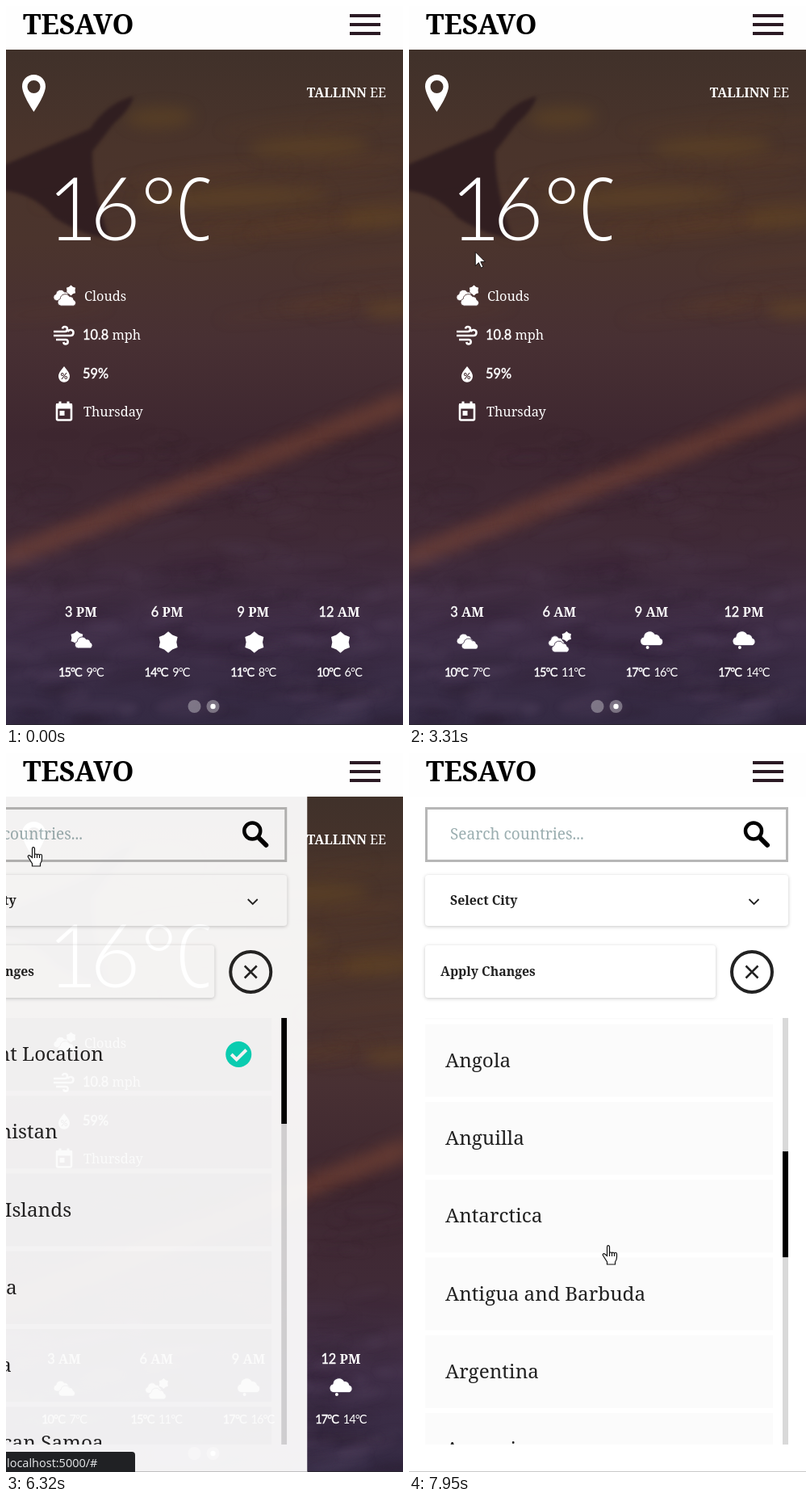
These frames come from a looping animation (492 by 890 pixels, 8 s). An HTML page with a canvas:

```html
<!DOCTYPE html>
<html lang="en">
<head>
<meta charset="utf-8">
<title>Weather</title>
<style>
html, body { margin: 0; width: 100%; height: 100%; overflow: hidden; background: #fff; }
#stage { position: relative; width: 492px; height: 890px; overflow: hidden; }
canvas, svg { position: absolute; left: 0; top: 0; }
text { font-family: "Noto Serif", serif; fill: #fff; white-space: pre; }
.num { font-family: Lato, "Open Sans", sans-serif; font-weight: 400; }
.firm { stroke: #fff; stroke-width: .4; }
.big { font-size: 108px; font-weight: 300; }
.slim { font-family: "Open Sans", "Noto Sans", sans-serif; font-stretch: 75%; }
.b { font-weight: 700; }
.mid { text-anchor: middle; }
.info { font-size: 16.3px; font-weight: 500; }
.hour { font-size: 16.3px; font-weight: 700; }
.temp { font-size: 14.5px; letter-spacing: -.9px; }
.white { fill: #fff; }
.line { fill: none; stroke: #fff; stroke-width: 2.6; }
.ink { fill: none; stroke: #222; }
.card { fill: #fff; filter: drop-shadow(0 1px 2px rgba(0,0,0,.22)); }
#panel text { fill: #212121; }
#panel .hint { fill: #9baeb0; }
#status {
  position: absolute; left: 0; bottom: 0; width: 120px; height: 25px;
  background: #202124; color: #e8eaed; border-radius: 0 4px 0 0;
  font: 14.5px/27px "Open Sans", "Noto Sans", sans-serif; text-indent: 1px;
  white-space: nowrap; overflow: hidden;
}
</style>
</head>
<body>
<div id="stage">
<canvas id="sky" width="492" height="890"></canvas>
<svg width="492" height="890" viewBox="0 0 492 890">
  <defs>
    <path id="cloud" d="M-9 7a5 5 0 0 1-1-9.800A7 7 0 0 1 3-6 5.500 5.500 0 0 1 9-1.500a4.500 4.500 0 0 1 0 8.500z"/>
    <clipPath id="strip"><rect x="20" y="735" width="450" height="105"/></clipPath>
    <clipPath id="window"><rect x="20" y="328" width="450" height="528"/></clipPath>
  </defs>

  <path class="white" fill-rule="evenodd" d="M34.500 85C26 85 20 91.500 20 99.500 20 110 34.500 131 34.500 131S49 110 49 99.500C49 91.500 43 85 34.500 85zm0 7a8 8 0 0 1 0 16 8 8 0 0 1 0-16z"/>
  <text x="471" y="112.500" text-anchor="end" font-size="16"><tspan font-weight="800">TALLINN</tspan> EE</text>
  <text class="num big" x="51 104 167" y="290">16°<tspan class="slim" x="210">C</tspan></text>

  <g id="now"></g>
  <text class="info" x="97" y="365">Clouds</text>
  <path class="line" d="M59 403h14a3 3 0 1 0-3-3.500M59 408h21a3.500 3.500 0 1 0-3.300-4.700M62 413h12a2.700 2.700 0 1 1-2.700 3"/>
  <text class="info" x="95" y="413"><tspan class="num firm">10.8</tspan> mph</text>
  <path class="white" d="M72 446c3 4 7 8 7 12.500a7 7.300 0 0 1-14 0c0-4.500 4-8.500 7-12.500z"/>
  <text class="num mid" x="72" y="462" font-size="11" style="fill:#432b30;font-weight:700">%</text>
  <text class="info num firm" x="95" y="461">59%</text>
  <rect class="line" x="63" y="493" width="18" height="19.500" rx="1.500"/>
  <path class="white" d="M62 492h20v6.500H62zM65.500 489.500h3v4h-3zM75.500 489.500h3v4h-3zM66.500 501h6v6h-6z"/>
  <text class="info" x="96" y="508">Thursday</text>

  <g clip-path="url(#strip)"><g id="hours"></g></g>
  <g fill="#fff" fill-opacity=".34"><circle cx="233.500" cy="867" r="8"/><circle cx="256.500" cy="867" r="8"/></g>
  <circle id="dot" class="white" cx="233.500" cy="867" r="3.200"/>
  <rect y="889" width="492" height="1" fill="#2a2530"/>

  <g id="panel">
    <rect x="-8" y="54" width="503" height="836" fill="#fff"/>
    <rect x="-8" y="889" width="503" height="1" fill="#c9c9c9"/>
    <rect x="21.500" y="68.500" width="447" height="65" fill="#fff" stroke="#b7b7b7" stroke-width="3"/>
    <text class="hint" x="51" y="107" font-size="19">Search countries...</text>
    <circle cx="427" cy="96.500" r="10" fill="none" stroke="#000" stroke-width="4.500"/>
    <path d="M435 105l9 9" stroke="#000" stroke-width="6" stroke-linecap="round"/>
    <rect class="card" x="20" y="151" width="450" height="63" rx="4"/>
    <text class="b" x="51" y="188" font-size="15.800">Select City</text>
    <path class="ink" d="M421.500 181l6 6 6-6" stroke-width="1.800"/>
    <rect class="card" x="20" y="238" width="360" height="65" rx="4"/>
    <text class="b" x="39" y="276" font-size="15.800">Apply Changes</text>
    <circle class="ink" cx="425" cy="271" r="25" stroke-width="4"/>
    <path class="ink" d="M417.500 263.500l15 15m0-15l-15 15" stroke-width="2.500"/>
    <g clip-path="url(#window)">
      <g id="list"></g>
      <rect x="463" y="328" width="7" height="528" fill="#d9d9d9"/>
      <rect id="thumb" x="463" y="328" width="7" height="131" fill="#000"/>
    </g>
  </g>

  <rect width="492" height="54" fill="#fefefe"/>
  <text x="21" y="34.500" font-size="34.300" style="fill:#000;font-weight:800">TESAVO</text>
  <path d="M426 12h38M426 23h38M426 34h38" stroke="#2b1a24" stroke-width="3.800"/>
</svg>

<div id="status">localhost:5000/#</div>

<svg width="492" height="890" viewBox="0 0 492 890">
  <g id="cursor">
    <circle id="press" r="15" fill="#a09a28"/>
    <path id="arrow" d="M0 0v17l4-4 3 6.500 2.500-1.200-3-6.300h5.500z" fill="#fff" stroke="#000" stroke-width=".8"/>
    <path id="beam" d="M-3.500-8.500h2.500l1 1 1-1h2.500M0-7.500V7.500M-3.500 8.500h2.500l1-1 1 1h2.500" fill="none" stroke="#c3c9cc"/>
    <g id="hand" fill="#fff" stroke="#111" stroke-width="1.200">
      <path d="M-1.500 1.500v11l-3-2.500c-1.500-1-3 .5-2 2l5 8v3h10v-3c1.500-2 2-4 2-6v-4c0-2-3-2-3 0 0-2-3-2.500-3-.5 0-2-3-2-3 0v-8c0-2.500-3-2.500-3 0z"/>
      <path d="M1.500 9v4M4.500 9v4M7.500 9.500V13" fill="none"/>
    </g>
  </g>
</svg>
</div>

<script>
const LOOP = 8000;
const $ = id => document.getElementById(id);

// Backdrop: dusk gradient, glowing streaks, wing and a bank of cloud
function paintSky() {
  const g = $('sky').getContext('2d');
  let seed = 7;
  const rnd = (lo, hi) => lo + (hi - lo) * (seed = seed * 16807 % 2147483647) / 2147483647;
  const blob = (x, y, rx, ry, turn, color, soft) => {
    g.filter = `blur(${soft}px)`;
    g.fillStyle = color;
    g.beginPath();
    g.ellipse(x, y, rx, ry, turn, 0, 7);
    g.fill();
  };

  const dusk = g.createLinearGradient(0, 54, 0, 890);
  ['#40312a', '#4a342b', '#4b342d', '#483033', '#3e2730', '#402a36', '#3f2e47', '#342a43']
    .forEach((c, i, all) => dusk.addColorStop(i / (all.length - 1), c));
  g.fillStyle = dusk;
  g.fillRect(0, 0, 492, 890);

  for (let i = 0; i < 24; i++)
    blob(rnd(60, 492), rnd(130, 400), rnd(50, 120), rnd(5, 12), -.1, 'rgba(122,84,34,.09)', 8);
  for (const [x, y, rx] of [[375, 174, 75], [190, 138, 42], [280, 238, 120], [465, 262, 50], [480, 375, 36]])
    blob(x, y, rx, 13, -.03, 'rgba(120,84,30,.32)', 9);
  for (let x = 0; x <= 492; x += 41)
    blob(x, 683 - x * .39, 48, 14, -.38, 'rgba(150,84,54,.24)', 9);

  g.filter = 'blur(2px)';
  g.fillStyle = 'rgba(43,25,31,.8)';
  g.fill(new Path2D('M-5 198L104 152Q125 120 158 112Q154 128 134 145L107 180Q106 225 128 288Q95 284 60 262Q35 232-5 228z'));

  for (let i = 0; i < 220; i++) {
    const y = rnd(530, 890), depth = (y - 480) / 400;
    const tint = i % 2 ? `rgba(112,92,122,${.13 * depth})` : `rgba(36,22,36,${.16 * depth})`;
    blob(rnd(0, 492), y, rnd(10, 50), rnd(3, 9), rnd(-.25, .1), tint, 4);
  }
}

// Weather icons
const cloud = (x, y, s = 1, edge = '#3e2f49') =>
  `<use href="#cloud" transform="translate(${x} ${y}) scale(${s})" fill="#fff" stroke="${edge}"/>`;
const sun = (x, y, r = 13.3) => {
  const pts = [...Array(12).keys()].map(i => {
    const a = i * Math.PI / 6, d = i % 2 ? r * .77 : r;
    return `${(x + d * Math.sin(a)).toFixed(1)},${(y - d * Math.cos(a)).toFixed(1)}`;
  });
  return `<polygon class="white" points="${pts.join(' ')}"/>`;
};
const icons = {
  clear: x => sun(x + 1.5, 787.5),
  few: x => sun(x - 5, 782, 8.5) + cloud(x + 4, 789, .85),
  two: x => cloud(x - 2, 784.5, .8) + cloud(x + 4, 790.5, .8),
  mixed: x => sun(x + 9, 780.5, 6.5) + cloud(x - 3, 787, .78) + cloud(x + 2, 794, .84),
  rain: x => cloud(x + 1, 784, 1.1) + `<circle class="white" cx="${x - 5}" cy="794" r="2"/>`
};
$('now').innerHTML = sun(80.5, 352, 6.5) + cloud(70, 359, .82, '#4b3233') + cloud(76, 365, .88, '#4b3233');

// Three-hourly forecast, two pages of four
$('hours').innerHTML = ['few 15 9', 'clear 14 9', 'clear 11 8', 'clear 10 6', 'two 10 7', 'mixed 15 11', 'rain 17 16', 'rain 17 14']
  .map((row, i) => {
    const [icon, hi, lo] = row.split(' ');
    const x = i < 4 ? 84.5 + i * 106.7 : 522 + (i - 4) * 114.3;
    const h = (15 + 3 * i) % 24;
    return `<text class="hour mid" x="${x}" y="756"><tspan class="num firm">${h % 12 || 12}</tspan> ${h < 12 ? 'AM' : 'PM'}</text>` +
      icons[icon](x) +
      `<text class="num temp mid" x="${x}" y="830"><tspan class="firm">${hi}°C</tspan>  ${lo}°C</text>`;
  }).join('');

$('list').innerHTML = ['Current Location', 'Afghanistan', 'Åland Islands', 'Albania', 'Algeria', 'American Samoa',
  'Andorra', 'Angola', 'Anguilla', 'Antarctica', 'Antigua and Barbuda', 'Argentina', 'Armenia', 'Aruba']
  .map((name, i) => {
    const y = 328 + i * 96.25;
    return `<rect x="20" y="${y}" width="431" height="90" fill="#fbfbfb"/><text x="45" y="${y + 53}" font-size="24.3">${name}</text>`;
  }).join('') +
  '<circle cx="410" cy="373" r="16" fill="#07d6b8"/><path d="M401 373l6.500 6.500 12-12" fill="none" stroke="#fff" stroke-width="4"/>';

// Timing helpers
const ramp = (t, from, to) => Math.min(1, Math.max(0, (t - from) / (to - from)));
const smooth = u => u * u * (3 - 2 * u);
const easeOut = u => 1 - (1 - u) ** 3;
const within = (t, from, to) => t >= from && t < to;

// Where the pointer comes to rest: time, x, y
const rests = [
  [70, 383, 864], [380, 359, 805], [530, 359, 805], [1600, 470, 770], [1950, 351, 768],
  [2050, 351, 764], [2450, 81, 757], [2990, 104, 390], [3850, 35, 118], [4230, 35, 118],
  [4460, 178, 273], [5000, 255, 328], [5800, 34, 121], [5900, 34, 117], [6320, 34, 117],
  [7010, 259, 616], [7900, 259, 616], [7945, 247, 610]
];
function pointer(t) {
  const i = rests.findIndex(r => r[0] > t);
  if (i < 1) return rests[i ? rests.length - 1 : 0].slice(1);
  const [a, b] = [rests[i - 1], rests[i]];
  const u = smooth(ramp(t, a[0], b[0]));
  return [1, 2].map(k => a[k] + (b[k] - a[k]) * u);
}

// Strip follows the drag: stiff past its start, free towards the next page
const PULL = [370, 1640], SWIPE = [1960, 2420], TAP = [5850, 6080];
function stripX(t) {
  const back = 1 - smooth(ramp(t, PULL[1], 1850));
  if (t < SWIPE[0]) return .35 * Math.max(0, pointer(Math.min(t, PULL[1]))[0] - 359) * back;
  const drag = pointer(Math.min(t, SWIPE[1]))[0] - 351;
  return drag + (-450 - drag) * easeOut(ramp(t, SWIPE[1], 2800));
}

const move = (id, x, y = 0) => $(id).setAttribute('transform', `translate(${x} ${y})`);
const fade = (id, v) => { $(id).style.opacity = +v; };

function draw(t) {
  const [x, y] = pointer(t);
  const pressed = [PULL, SWIPE, TAP].some(p => within(t, ...p));
  const onPin = within(x, 20, 49) && y < 135;
  const onText = within(x, 62, 265) && within(y, 200, 300);
  const shape = t > 6200 || onPin ? 'hand' : onText ? 'beam' : 'arrow';
  move('cursor', x, y);
  fade('cursor', t >= 70);
  fade('press', pressed);
  for (const id of ['hand', 'beam', 'arrow']) fade(id, id === shape);

  move('hours', stripX(t));
  move('dot', within(t, PULL[1], 2600) ? 0 : 23);

  const hint = from => ramp(t, from, from + 100);
  fade('status', hint(3900) - hint(4560) + hint(5840) - hint(6420));
  $('status').style.width = 120 + 40 * ramp(t, 5980, 6100) + 'px';

  const open = easeOut(ramp(t, 6200, 6524));
  move('panel', -495 * (1 - open));
  fade('panel', t > 6200 ? .76 + .24 * open : 0);

  const notch = (from, to) => 333 * smooth(ramp(t, from, to));
  const scroll = notch(7090, 7255) + notch(7550, 7720);
  move('list', 0, -scroll);
  move('thumb', 0, scroll * .248);
}

const start = performance.now();
function tick() {
  draw((performance.now() - start) % LOOP);
  requestAnimationFrame(tick);
}
paintSky();
tick();
</script>
</body>
</html>
```
